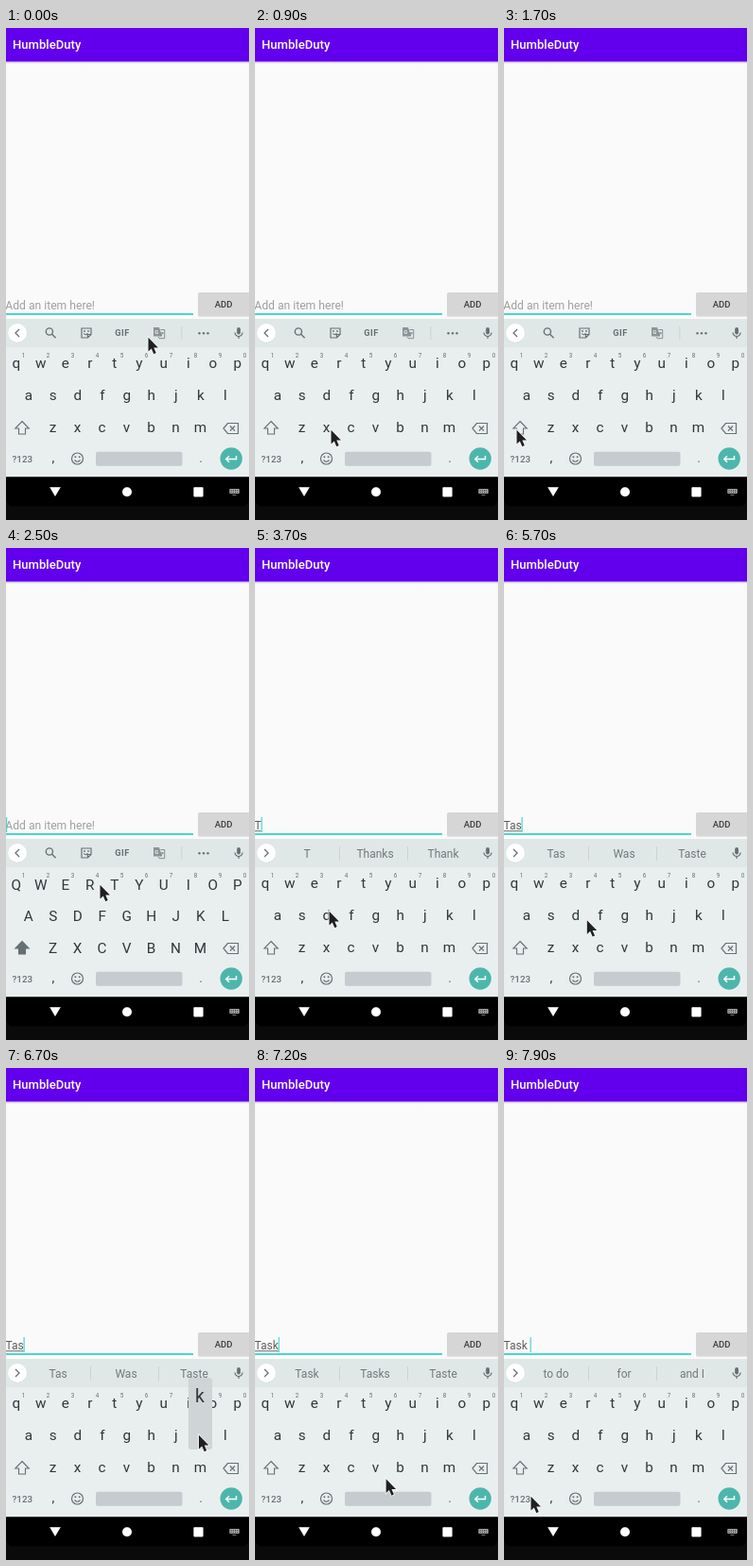
Animation of 257 by 521 pixels, one loop 8 s. Source, as an HTML page with a canvas:

```html
<!DOCTYPE html>
<html lang="en">
<head>
<meta charset="utf-8">
<title>To-do keyboard</title>
<style>
html, body { margin: 0; width: 100%; height: 100%; overflow: hidden; background: #000; }
canvas { display: block; width: 257px; height: 521px; }
</style>
</head>
<body>
<canvas id="stage"></canvas>
<script>
const W = 257, H = 521, LOOP = 8000, STEP = 100;
const canvas = document.getElementById('stage');
const ctx = canvas.getContext('2d');
const scale = window.devicePixelRatio || 1;
canvas.width = W * scale;
canvas.height = H * scale;

const INK = '#30373a', ICON = '#667074', TEAL = '#4dd5cb';
const ROWS = [
  { keys: 'qwertyuiop', x: 10.8, y: 360, capY: 361.8, gap: 26 },
  { keys: 'asdfghjkl', x: 23.8, y: 393.7, capY: 395, gap: 26 },
  { keys: 'zxcvbnm', x: 49.5, y: 427.5, capY: 429, gap: 26 }
];

// Each stage of the typed text, with the time its caret starts to blink.
const TEXTS = [
  { at: 0, blink: -900, text: '' },
  { at: 3400, blink: 3400, text: 'T', line: true },
  { at: 4700, blink: 4800, text: 'Ta', line: true },
  { at: 5400, blink: 5400, text: 'Tas', line: true },
  { at: 6800, blink: 6800, text: 'Task', line: true },
  { at: 7500, blink: 7500, text: 'Task ' }
];
const STRIPS = [
  { at: 0, words: null },
  { at: 3600, words: ['T', 'Thanks', 'Thank'] },
  { at: 4800, words: ['Ta', 'Take', 'Talk'] },
  { at: 5500, words: ['Tas', 'Was', 'Taste'] },
  { at: 6900, words: ['Task', 'Tasks', 'Taste'] },
  { at: 7600, words: ['to do', 'for', 'and I'] }
];
const POPUPS = [
  { from: 3400, to: 3600, key: 'T', x: 115, y: 295 },
  { from: 4600, to: 4700, key: 'a', x: 23.8, y: 328 },
  { from: 5300, to: 5400, key: 's', x: 49.8, y: 328 },
  { from: 6700, to: 6800, key: 'k', x: 205.5, y: 328 }
];
// Pointer path: time, x, y
const PATH = [
  [300, 150, 327], [700, 95, 421], [800, 95, 421], [1100, 50, 433],
  [1400, 20, 430], [1700, 13, 425], [2000, 13, 425], [2500, 99, 356],
  [2800, 107, 356], [2900, 107, 356], [3100, 116, 354], [3500, 116, 354],
  [3700, 78, 384], [3800, 78, 384], [4400, 24, 390], [4600, 24, 390],
  [4800, 42, 394], [4900, 42, 394], [5100, 42, 388], [5500, 42, 388],
  [5800, 110, 396], [6100, 192, 391], [6400, 203.5, 388], [6700, 203.5, 388],
  [7400, 112, 453], [7500, 112, 453], [7900, 28, 453]
];

const latest = (list, t) => list.filter(s => s.at <= t).pop();

function pointerAt(t) {
  const next = PATH.findIndex(p => p[0] >= t);
  if (next === 0) return PATH[0].slice(1);
  if (next < 0) return PATH[PATH.length - 1].slice(1);
  const a = PATH[next - 1], b = PATH[next];
  const k = (t - a[0]) / (b[0] - a[0]);
  return [a[1] + (b[1] - a[1]) * k, a[2] + (b[2] - a[2]) * k];
}

function rect(x, y, w, h, color) {
  ctx.fillStyle = color;
  ctx.fillRect(x, y, w, h);
}

function round(x, y, w, h, r, color) {
  ctx.fillStyle = color;
  ctx.beginPath();
  ctx.roundRect(x, y, w, h, r);
  ctx.fill();
}

function disc(x, y, r, color) {
  ctx.fillStyle = color;
  ctx.beginPath();
  ctx.arc(x, y, r, 0, Math.PI * 2);
  ctx.fill();
}

function text(str, x, y, size, color, align = 'center', weight = 400) {
  ctx.font = `${weight} ${size}px Roboto, sans-serif`;
  ctx.textAlign = align;
  ctx.fillStyle = color;
  ctx.fillText(str, x, y);
}

// Draws an SVG path moved to x, y: filled, or stroked when a width is given.
function shape(d, x, y, color, width) {
  const path = new Path2D(d);
  ctx.save();
  ctx.translate(x, y);
  if (width) {
    ctx.strokeStyle = color;
    ctx.lineWidth = width;
    ctx.stroke(path);
  } else {
    ctx.fillStyle = color;
    ctx.fill(path);
  }
  ctx.restore();
}

function drawApp(t) {
  rect(0, 0, W, 308, '#fafafa');
  const shade = ctx.createLinearGradient(0, 35, 0, 38);
  shade.addColorStop(0, '#c3b4dc');
  shade.addColorStop(1, '#fafafa');
  rect(0, 35, W, 3, shade);
  rect(0, 0, W, 35.5, '#6200ee');
  text('HumbleDuty', 7, 21.8, 13.1, '#fff', 'left', 500);

  const state = latest(TEXTS, t);
  rect(0, 302, 198, 2, TEAL);
  if (state.text) {
    text(state.text, -0.5, 298, 12, '#5c5c5c', 'left');
  } else {
    text('Add an item here!', -0.7, 298, 12.15, '#a0a0a0', 'left');
  }
  ctx.font = '400 12px Roboto, sans-serif';
  const end = ctx.measureText(state.text).width - 0.5;
  if (state.line) rect(0, 299.3, end, 0.9, '#5c5c5c');
  if (Math.max(0, t - state.blink) % 1000 < 500) {
    rect(Math.max(0, end - 0.2), 285, 1.2, 16, TEAL);
  }

  round(203, 280, 56, 25.5, 1.5, '#d6d6d6');
  rect(204, 305.5, 53, 0.8, '#e3e3e3');
  text('ADD', 230, 296.3, 9.5, '#3c3c3c', 'center', 500);
}

function drawTools() {
  shape('M2 -4 L-2 0 L2 4', 12, 323, ICON, 1.3);
  shape('M2.5 -1.5 A3.6 3.6 0 1 1 -4.7 -1.5 A3.6 3.6 0 1 1 2.5 -1.5 M1.6 1.2 L5.6 5.2', 47, 323, ICON, 1.4);
  shape('M-5 -5 H5 V1.5 L1.5 5 H-5 Z M5 1.5 H1.5 V5 M-2.8 .5 Q-.8 3 1.5 .5', 85, 323, ICON, 1.2);
  disc(83, 321, 0.9, ICON);
  disc(87, 321, 0.9, ICON);
  ctx.letterSpacing = '0.5px';
  text('GIF', 123, 326.3, 9.2, ICON, 'center', 700);
  ctx.letterSpacing = '0px';

  // Translate key: two overlapping cards
  shape('M-6 -6 H0 L3.2 3.5 H-6 Z', 162, 323, '#8b9497');
  shape('M1.5 -3.5 H5.7 V5.7 H0 L-1 4 M1.5 0 H5 M3.2 -1 V0 Q3 2 1.5 3.3', 162, 323, '#7c8689', 0.9);
  text('G', 159.2, 324, 6, '#e8eeee', 'center', 700);

  rect(185.5, 316, 0.8, 14, '#c6cdce');
  for (const x of [204.5, 209, 213.5]) disc(x, 323.2, 1.2, ICON);
}

function drawWords(words) {
  shape('M-2 -4 L2 0 L-2 4', 12, 323, ICON, 1.3);
  words.forEach((w, i) => text(w, 55 + 72 * i, 328, 12, '#71787c'));
  rect(89, 316, 0.8, 15, '#c9d0d1');
  rect(161, 316, 0.8, 15, '#c9d0d1');
}

function drawStrip(t) {
  rect(0, 308, W, 30, '#e0e7e7');
  disc(12, 323.4, 10.2, '#d2d9d9');
  disc(12, 323, 10, '#fff');
  const { words } = latest(STRIPS, t);
  if (words) drawWords(words);
  else drawTools();
  round(244.2, 317, 3.8, 7.5, 1.9, ICON);
  shape('M-4 -.5 A4 4 0 0 0 4 -.5 M0 3.5 V6', 246.1, 323, ICON, 1.2);
}

function drawKeys(t) {
  rect(0, 337, W, 139, '#e9efef');
  const caps = t >= 1800 && t < 3400;
  ROWS.forEach((row, r) => {
    [...row.keys].forEach((key, i) => {
      const x = row.x + row.gap * i;
      if (caps) text(key.toUpperCase(), x, row.capY, 15.3, INK);
      else text(key, x, row.y, 15.3, INK);
      if (r === 0) text(String((i + 1) % 10), x + 7.7, 349, 6.3, ICON);
    });
  });

  const arrow = 'M0 -7 L7.2 .5 H3.5 V6.5 H-3.5 V.5 H-7.2 Z';
  if (caps) shape(arrow, 17, 423.5, ICON);
  shape(arrow, 17, 423.5, ICON, 1.1);
  shape('M-8 0 L-3.5 -5.5 H7.5 V5.5 H-3.5 Z M-1 -2.5 L4 2.5 M4 -2.5 L-1 2.5', 238, 424, ICON, 1.2);

  text('?123', 17.3, 459.5, 9.8, ICON, 'center', 500);
  text(',', 50, 459.5, 14, INK);
  shape('M6 0 A6 6 0 1 1 -6 0 A6 6 0 1 1 6 0 M-3 1.5 Q0 5 3 1.5', 75.5, 456, ICON, 1.2);
  disc(73.4, 454.2, 1, ICON);
  disc(77.6, 454.2, 1, ICON);
  round(95, 448.7, 91.5, 15, 2, '#c5cbce');
  text('.', 206, 459.5, 14, ICON);
  disc(238.2, 456, 11.7, '#4db6ac');
  shape('M5.5 -3.5 V0 H-5 M-2 -3.2 L-5.2 0 L-2 3.2', 238, 456.5, '#fff', 1.5);
}

function drawNav() {
  rect(0, 475.5, W, 46, '#0a0a0a');
  round(0, 475.5, W, 31, [0, 0, 8, 8], '#000');
  shape('M-5.8 -4.7 H5.8 L0 5 Z', 52, 491, '#fff');
  disc(128, 491.2, 5, '#fff');
  round(198.4, 486.2, 10.2, 10.2, 0.8, '#fff');
  round(236.3, 488, 10.5, 5, 0.8, '#a8a8a8');
  for (let i = 0; i < 8; i++) {
    rect(237.6 + (i % 4) * 2.2, 489 + Math.floor(i / 4) * 2, 1, 1, '#222');
  }
  rect(239.5, 494, 4, 1, '#777');
}

function drawPopup(t) {
  const p = POPUPS.find(p => t >= p.from && t < p.to);
  if (!p) return;
  round(p.x - 12.6, p.y, 25.2, 76, 3, '#cfd5d7');
  text(p.key, p.x - 0.5, p.y + 26, 19.5, INK);
}

function drawPointer(t) {
  const [x, y] = pointerAt(t);
  const d = 'M.5 .8 V15.6 L3.8 12.5 L6.3 18.2 L8.7 17.1 L6.3 11.6 H10.9 Z';
  shape(d, x, y, '#f4f6f6', 1.6);
  shape(d, x, y, '#202020');
}

function draw(t) {
  ctx.setTransform(scale, 0, 0, scale, 0, 0);
  drawApp(t);
  drawKeys(t);
  drawStrip(t);
  drawNav();
  drawPopup(t);
  drawPointer(t);
}

const start = performance.now();
function tick() {
  const t = (performance.now() - start) % LOOP;
  draw(Math.floor(t / STEP) * STEP);
  requestAnimationFrame(tick);
}
tick();
</script>
</body>
</html>
```
